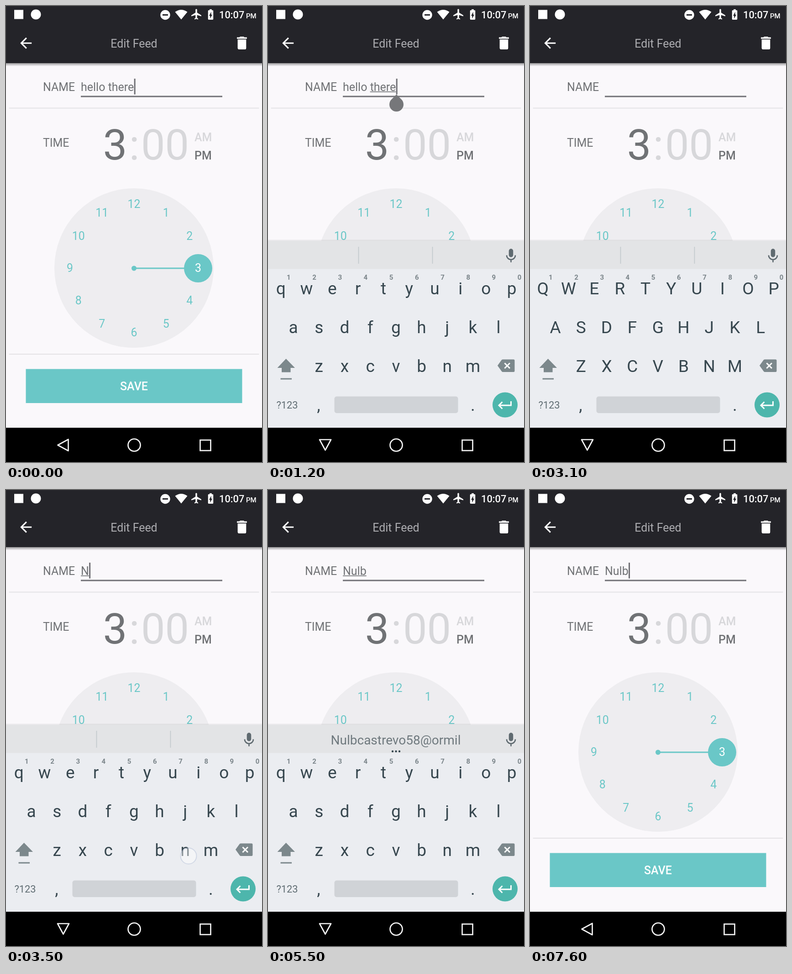
Animation of 561x998 px, one loop 8 s. Source, as an HTML page:

```html
<!DOCTYPE html>
<html lang="en">
<head>
<meta charset="utf-8">
<title>Edit Feed</title>
<style>
html, body { margin: 0; width: 100%; height: 100%; overflow: hidden; background: #faf8fb; }
svg { display: block; width: 561px; height: 998px; font-family: Roboto, "Open Sans", sans-serif; }
text { white-space: pre; }
.label { font-size: 24.9px; fill: #707275; }
.mid { text-anchor: middle; }
.medium { font-weight: 500; }
.clock { font-size: 93.5px; fill: #707275; }
.off { fill: #d7d7da; }
.key { font-size: 37px; fill: #37474f; }
.hint { font-size: 15px; font-weight: 700; fill: #7b858a; }
.suggest { font-size: 28px; fill: #6f797e; }
.line { fill: none; stroke: #f2f2f2; stroke-width: 2.7; }
</style>
</head>
<body>
<svg viewBox="0 0 561 998">
  <defs>
    <linearGradient id="shade" x2="0" y2="1">
      <stop stop-color="#000" stop-opacity=".38"/>
      <stop offset="1" stop-color="#000" stop-opacity="0"/>
    </linearGradient>
  </defs>

  <rect width="561" height="998" fill="#faf8fb"/>

  <!-- form -->
  <text class="label" x="81" y="186">NAME</text>
  <text class="label" id="name" x="164" y="186" style="font-size:25px"></text>
  <rect id="compose" y="187" height="1.6" fill="#707275"/>
  <rect x="164" y="196.5" width="310" height="3" fill="#707075"/>
  <rect id="cursor" y="159" width="3" height="34.5" fill="#707075"/>
  <path d="M6.500 223.500H554.500M6.500 762H554.500" stroke="#e4e3e6" stroke-width="2"/>
  <text class="label" x="81" y="308">TIME</text>
  <text class="clock mid" x="239" y="336">3</text>
  <text class="clock mid off" x="281" y="336">:</text>
  <text class="clock mid off" x="348.500" y="336">00</text>
  <text class="label medium off" x="413" y="295.500" style="fill:#d7d7da">AM</text>
  <text class="label medium" x="413" y="335.500">PM</text>

  <circle cx="280.5" cy="573.5" r="174.500" fill="#eeedf0"/>
  <g fill="#6ac7c7">
    <path d="M280 574H400" stroke="#6ac7c7" stroke-width="3"/>
    <circle cx="280.5" cy="574" r="5.500"/>
    <circle cx="421" cy="574" r="31"/>
    <g id="hours" class="mid" font-size="24.9"></g>
    <rect x="43.500" y="794.500" width="474" height="74.500"/>
  </g>
  <text class="label mid medium" x="280.500" y="841" style="fill:#fff">SAVE</text>

  <path id="handle" d="M281.500 193.500L292.500 204.500A15.500 15.500 0 1 1 270.500 204.500Z" fill="#76777a"/>

  <!-- header -->
  <rect y="125" width="561" height="7" fill="url(#shade)"/>
  <rect width="561" height="125" fill="#242429"/>
  <g fill="#fff">
    <rect x="18" y="8.500" width="20" height="20"/>
    <circle cx="65.500" cy="18.500" r="11"/>
    <circle cx="349" cy="19.500" r="10.700"/>
    <rect x="343" y="18" width="12" height="3" fill="#242429"/>
    <path d="M370.500 13Q384 3.500 397.500 13L384 29.500Z"/>
    <path transform="translate(403.800 4.200) scale(1.150)" d="M21 16v-2l-8-5V3.500c0-.83-.67-1.500-1.500-1.500S10 2.670 10 3.500V9l-8 5v2l8-2.500V19l-2 1.500V22l3.500-1 3.500 1v-1.500L13 19v-5.500z"/>
    <path transform="translate(434.700 4.700) scale(1.150)" fill-rule="evenodd" d="M15.700 4H14V2h-4v2H8.300Q7 4 7 5.300v15.400Q7 22 8.300 22h7.400q1.300 0 1.300-1.300V5.300Q17 4 15.700 4zM11 20v-5.500H9L13 7v5.500h2z"/>
    <text class="medium" x="467" y="27" font-size="21.8">10:07</text>
    <text class="medium" x="526" y="27" font-size="15">PM</text>
    <path transform="translate(25 62.500) scale(1.558)" d="M20 11H7.830l5.590-5.590L12 4l-8 8 8 8 1.410-1.410L7.830 13H20z"/>
    <path transform="translate(498.300 62.300) scale(1.558)" d="M6 19q0 2 2 2h8q2 0 2-2V7H6zM19 4h-3.500l-1-1h-5l-1 1H5v2h14z"/>
  </g>
  <text class="label mid" x="280.500" y="90.500" style="fill:#adadb1">Edit Feed</text>

  <!-- keyboard -->
  <g id="board">
    <rect y="511.500" width="561" height="3" fill="#000" opacity=".06"/>
    <rect y="514" width="561" height="62" fill="#e3e4e6"/>
    <rect y="575.500" width="561" height="350" fill="#ebedf1"/>
    <path id="bars" d="M198.500 527V564M360.500 527V564" stroke="#c2c9cc" stroke-width="1.700"/>
    <g id="words" class="suggest mid"></g>
    <g id="dots" fill="#37474f">
      <circle cx="273" cy="572" r="2.200"/><circle cx="280.500" cy="572" r="2.200"/><circle cx="288" cy="572" r="2.200"/>
    </g>
    <g fill="none" stroke="#5f6a70">
      <path d="M532.500 536V545" stroke-width="9.500" stroke-linecap="round"/>
      <path d="M523 545.500a9.500 9.500 0 0 0 19 0M532.500 555V561" stroke-width="2.600"/>
    </g>
    <rect id="pressed" x="487" y="755" width="70" height="64" fill="#d0d3d7"/>
    <g id="keys" class="mid"></g>
    <g fill="#7c888c">
      <path d="M39.500 772L59 792H49.500V801.500H30V792H20.500Z"/>
      <rect x="27.500" y="814.500" width="24.500" height="3"/>
      <path d="M503 787L512 774.500Q513 773.500 515 773.500H538Q540.500 773.500 540.500 776V798.500Q540.500 801 538 801H515Q513 801 512 799.500Z"/>
    </g>
    <path d="M518.500 781.500L530 793M530 781.500L518.500 793" stroke="#fff" stroke-width="3"/>
    <text x="18.500" y="881" font-size="21.8" fill="#5f6c72">?123</text>
    <rect x="145.500" y="854.500" width="271" height="36.500" rx="5" fill="#d0d3d7"/>
    <text class="key mid" x="111" y="886">,</text>
    <text class="key mid" x="449" y="886">.</text>
    <circle cx="519.500" cy="873" r="27.500" fill="#4db6ac"/>
    <path d="M532.500 865V874H507M513.500 866.500L506 874L513.500 881.500" fill="none" stroke="#fff" stroke-width="2.900"/>
  </g>

  <!-- navigation -->
  <rect y="923" width="561" height="75"/>
  <rect id="ripple" y="925" height="72" rx="36" fill="#1d1d20"/>
  <path id="back" class="line" d="M113.500 961L136.500 948.500V973.500Z" stroke-linejoin="round"/>
  <circle class="line" cx="281" cy="961" r="13.500"/>
  <rect class="line" x="425.500" y="950" width="23" height="23"/>

  <circle id="touch" r="17.500" fill="#fff" fill-opacity=".88" stroke="#b9c4da" stroke-width="2"/>
</svg>

<script>
const LOOP = 8000, STEP = 100;
const $ = id => document.getElementById(id);
const clamp = v => Math.max(0, Math.min(1, v));
const set = (el, attrs) => { for (const k in attrs) el.setAttribute(k, attrs[k]); };
const show = (el, on) => set(el, { visibility: on ? 'visible' : 'hidden' });

// last entry of [time, ...values] that has begun
const at = (track, t) => track.filter(e => e[0] <= t).pop();

function label(parent, string, x, y, attrs = {}) {
  const el = document.createElementNS('http://www.w3.org/2000/svg', 'text');
  set(el, { x, y, ...attrs });
  el.textContent = string;
  return parent.appendChild(el);
}

for (let h = 1; h <= 12; h++) {
  const a = h * Math.PI / 6;
  label($('hours'), h, 280.5 + 140.5 * Math.sin(a), 582.4 - 140.5 * Math.cos(a), h === 3 ? { fill: '#fff' } : {});
}

const letters = [];
[['qwertyuiop', 28.3, 630.5], ['asdfghjkl', 55.5, 715.8], ['zxcvbnm', 111.8, 801]].forEach(([row, x, y], r) =>
  [...row].forEach((c, i) => {
    const kx = x + 56.2 * i;
    letters.push(label($('keys'), c, kx, y, { class: 'key' }));
    if (!r) label($('keys'), (i + 1) % 10, kx + 17, 599, { class: 'hint' });
  }));

const words = [127, 280, 433].map((x, i) =>
  label($('words'), '', x, 557, i === 1 ? { 'font-weight': 700 } : {}));

// time, text, start of the underlined part (-1: none)
const typing = [[0, 'hello there', -1], [1100, 'hello there', 6], [2000, 'hello the', 6], [2100, 'hello t', 6],
  [2200, 'hello', 0], [2300, 'hel', 0], [2400, 'h', 0], [2500, '', -1], [3400, 'N', 0], [3700, 'Nu', 0],
  [3900, 'Nul', 0], [4100, 'Nulb', 0], [6500, 'Nulb', -1]];
const suggestions = [[0, ''], [2200, 'jello', 'hello', 'hell'], [2500, ''], [4100, '', 'Nulbcastrevo58@ormil']];
const blink = [[0, 1], [400, 0], [800, 1], [1600, 0], [2000, 1], [3000, 0], [3400, 1], [4600, 0], [5100, 1],
  [5500, 0], [6000, 1], [6500, 0], [6600, 1], [7100, 0], [7600, 1]];
// time, x, y, opacity
const touches = [[0, 0, 0, 0], [800, 283, 180, 1], [900, 283, 180, .5], [1000, 0, 0, 0],
  [1800, 557, 790, 1], [2500, 557, 790, .8], [2600, 557, 790, .4], [2700, 0, 0, 0],
  [2900, 25, 814, 1], [3000, 25, 814, .5], [3100, 0, 0, 0],
  [3300, 399, 800, 1], [3500, 400, 801, .5], [3600, 0, 0, 0],
  [3700, 490, 625, 1], [3800, 117, 628, 1], [3900, 117, 628, .6], [4000, 533, 726, 1],
  [4100, 533, 726, .5], [4200, 0, 0, 0], [4300, 260.5, 364.5, 1], [4400, 262, 368, .8], [4500, 262, 368, .4],
  [4600, 0, 0, 0], [4900, 228.5, 317, 1], [5000, 228.5, 317, .5], [5100, 0, 0, 0],
  [7400, 247, 345, .8], [7500, 247, 345, .4], [7600, 0, 0, 0]];

function drawField(t) {
  const [, string, from] = at(typing, t), name = $('name');
  name.textContent = string;
  const width = n => n > 0 ? name.getSubStringLength(0, n) : 0;
  const end = width(string.length), start = width(from);
  set($('cursor'), { x: 164.3 + end });
  show($('cursor'), at(blink, t)[1]);
  set($('compose'), { x: 164 + start, width: Math.max(0, end - start) });
  show($('compose'), from >= 0);
  show($('handle'), t >= 1000 && t < 2000);
}

function drawKeyboard(t) {
  const shown = t < 4000 ? clamp((t - 850) / 200) : 1 - clamp((t - 6676) / 200);
  set($('board'), { opacity: shown, transform: `translate(0 ${41 * (1 - shown) ** 1.75})` });
  const [, ...list] = at(suggestions, t);
  const single = list.length === 2;
  words.forEach((el, i) => el.textContent = list[i] || '');
  set(words[1], { 'font-weight': single ? 400 : 700, fill: single ? '#6f797e' : '#46545a' });
  words[1].style.fill = single ? '' : '#46545a';
  show($('dots'), list.length > 1);
  show($('bars'), !single);
  show($('pressed'), t >= 1800 && t < 2600);
  const caps = t >= 2900 && t < 3400;
  for (const el of letters) {
    const c = el.textContent;
    el.textContent = caps ? c.toUpperCase() : c.toLowerCase();
  }
}

function drawNav(t) {
  const turn = t < 4000 ? clamp((t - 800) / 300) : 1 - clamp((t - 6500) / 245);
  set($('back'), { transform: `rotate(${-90 * turn} 125 960.500)` });
  const w = 167 * clamp((t - 6400) / 300);
  set($('ripple'), { x: 124.5 - w / 2, width: w, opacity: t < 6500 ? 0 : 1 - clamp((t - 6750) / 500) });
}

function frame() {
  const t = Math.floor(performance.now() % LOOP / STEP) * STEP;
  drawField(t);
  drawKeyboard(t);
  drawNav(t);
  const [, cx, cy, opacity] = at(touches, t);
  set($('touch'), { cx, cy, opacity });
  requestAnimationFrame(frame);
}
frame();
</script>
</body>
</html>
```
